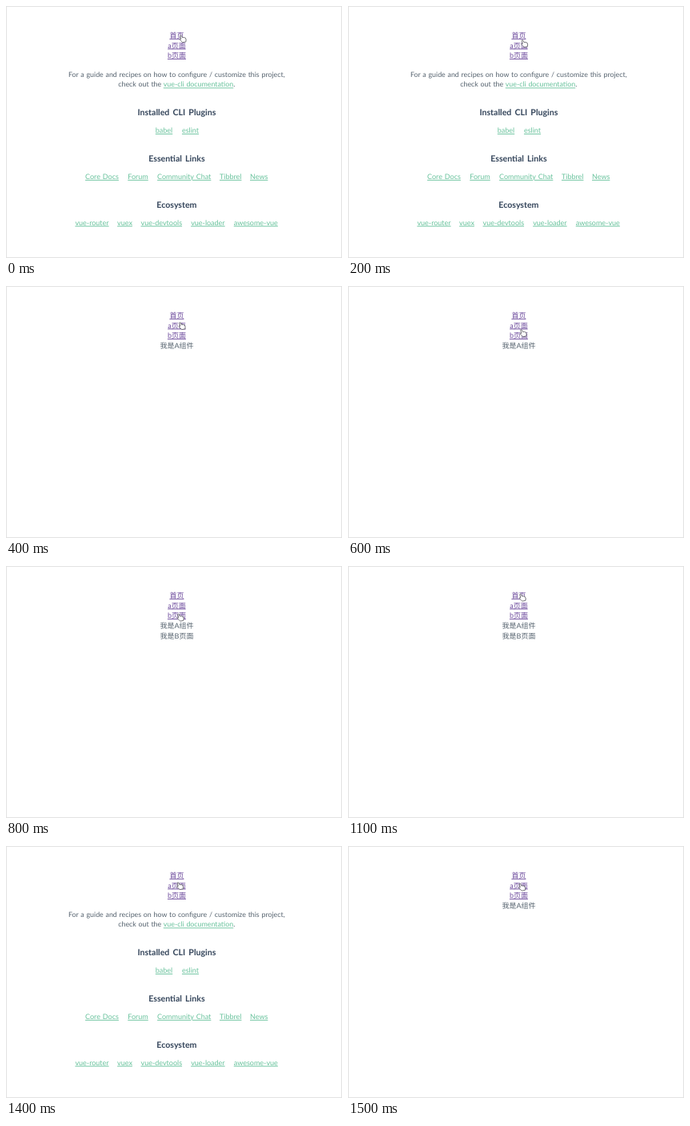
An HTML page that plays this animation: 420x316 px, repeating every 1.6 s.

```html
<!DOCTYPE html>
<html lang="zh-CN">
<head>
<meta charset="utf-8">
<title>Router demo</title>
<style>
  html, body { margin: 0; width: 100%; height: 100%; overflow: hidden; background: #fff; }
  svg { display: block; width: 420px; height: 316px; }
  text {
    font: 9px Lato, "Noto Sans CJK SC", "Noto Sans CJK JP", sans-serif;
    fill: #56636f;
    text-anchor: middle;
    text-rendering: geometricPrecision;
    word-spacing: .6px;
  }
  .intro { font-size: 8.85px; word-spacing: .5px; }
  .head { font-size: 10.6px; font-weight: 700; word-spacing: 1.6px; fill: #33445a; }
  .link, .nav {
    text-decoration: underline;
    text-decoration-thickness: .6px;
    text-underline-offset: 1px;
  }
  .link { fill: #68c29c; }
  .nav { fill: #6c4a9c; }
  .nav.active { fill: #ea5548; }
</style>
</head>
<body>
<svg viewBox="0 0 420 316">
  <rect x=".5" y=".5" width="419" height="315" fill="#fff" stroke="#e2e2e2"/>
  <g id="nav"></g>
  <g id="home">
    <text class="intro" x="213.3" y="89">For a guide and recipes on how to configure / customize this project,</text>
    <text class="intro" x="213.3" y="101.4">check out the <tspan class="link">vue-cli documentation</tspan>.</text>
  </g>
  <text id="pageA" x="213.5" y="78.2">我是A组件</text>
  <text id="pageB" x="213.5" y="90.8">我是B页面</text>
  <circle id="ring" cx="218.6" cy="46" r="17.1" fill="#fff" fill-opacity=".2" stroke="#3c3c44" stroke-width=".9"/>
  <path id="hand" fill="#fff" stroke="#4a4a50" stroke-width=".8" stroke-linejoin="round"
    d="M-3.6-4.2q.8-1 1.8 0L-.6-1.6q2.2-.6 4.2.6q1.4 1.6.6 5.2L-.4 5q-2-2-3.8-4q0-1.4 1.8-.6Z"/>
</svg>
<script>
const $ = id => document.getElementById(id);
const STEP = 100, STEPS = 16;

function addText(parent, str, x, y, cls) {
  const el = document.createElementNS("http://www.w3.org/2000/svg", "text");
  el.setAttribute("x", x);
  el.setAttribute("y", y);
  el.setAttribute("class", cls);
  el.textContent = str;
  parent.append(el);
  return el;
}

const [, linkA] = ["首页", "a页面", "b页面"].map((s, i) =>
  addText($("nav"), s, 213.4, 39.9 + i * 12.6, "nav"));

const sections = [
  ["Installed CLI Plugins", [["babel", 197.5], ["eslint", 230.5]]],
  ["Essential Links", [["Core Docs", 120], ["Forum", 165], ["Community Chat", 222.7],
    ["Tibbrel", 280.7], ["News", 316.2]]],
  ["Ecosystem", [["vue-router", 107.5], ["vuex", 148.5], ["vue-devtools", 194.3],
    ["vue-loader", 252.4], ["awesome-vue", 312.3]]]
];
sections.forEach(([title, links], i) => {
  const y = 137.1 + i * 57.8;
  addText($("home"), title, 213.4, y, "head");
  for (const [label, x] of links) addText($("home"), label, x, y + 22, "link");
});

// Pointer position for each step
const pointer = [
  [221, 41], [221, 43], [220.5, 47], [220, 50], [220, 50], [219.5, 53], [219, 59], [218, 64.5],
  [218, 64.5], [218, 60], [218, 48], [218, 39.5], [218, 39.5], [218, 43], [217.5, 50], [217.5, 51.5]
];

const within = (n, from, to) => n >= from && n < to;
const show = (id, on) => $(id).style.display = on ? "" : "none";

function draw(now) {
  const n = Math.floor(now / STEP) % STEPS;
  const home = within(n, 0, 4) || within(n, 12, 15);
  const clicking = n === 3;
  show("home", home);
  show("pageA", !home);
  show("pageB", within(n, 8, 12));
  show("ring", clicking);
  linkA.classList.toggle("active", clicking);
  $("hand").setAttribute("transform", `translate(${pointer[n]}) scale(.92)`);
}

const start = performance.now();
function tick() {
  draw(performance.now() - start);
  requestAnimationFrame(tick);
}
tick();
</script>
</body>
</html>
```
